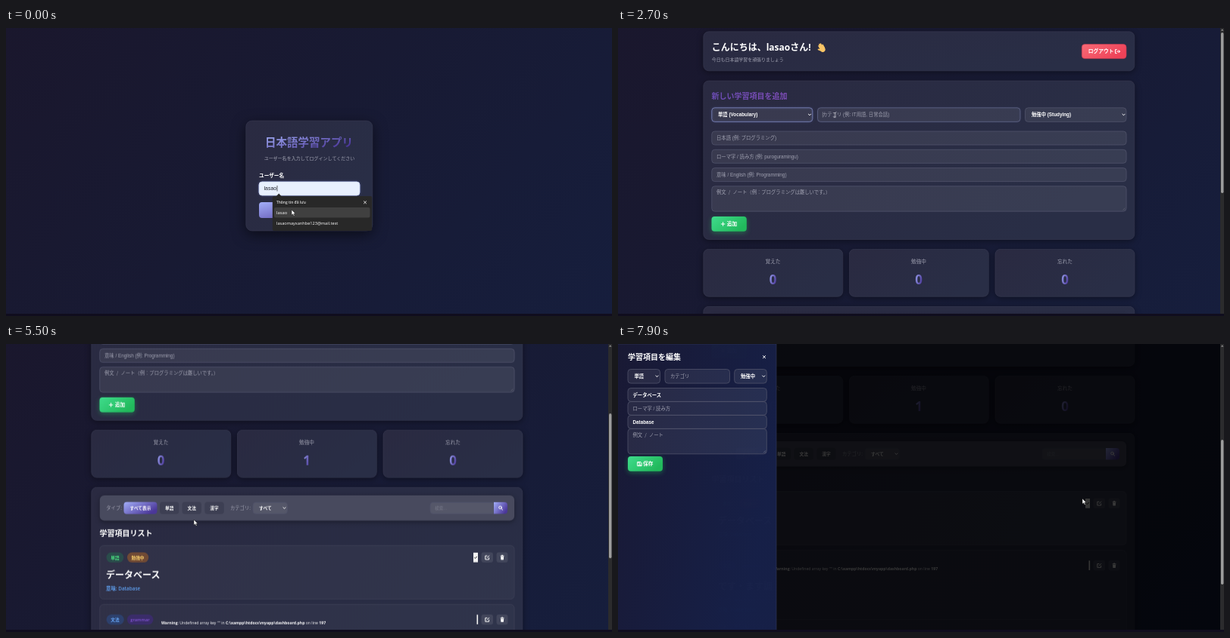
These frames come from a looping animation (800 px wide and 382 px high, 8000 ms). An HTML page:

```html
<!DOCTYPE html>
<html lang="ja">
<head>
<meta charset="utf-8">
<title>日本語学習アプリ</title>
<style>
html, body { margin: 0; height: 100%; overflow: hidden; background: #191a32; }
svg { display: block; width: 100vw; height: 100vh; background: linear-gradient(135deg, #1a172d, #181a33 45%, #161e3d); }
text { font: 6.3px "Open Sans", "Noto Sans CJK JP", sans-serif; fill: #fff; white-space: pre; }
.b { font-weight: 700; }
.s { font-weight: 600; }
.f { font-family: "Liberation Sans", "Noto Sans CJK JP", sans-serif; font-size: 6.33px; }
.n { font-family: "Noto Sans CJK JP", monospace; font-size: 6.33px; }
.m { fill: #9fa0b0; }
.k { fill: #20222c; }
.c { text-anchor: middle; }
.h { font-size: 10px; font-weight: 700; }
.t { font-size: 12px; font-weight: 700; }
.tag { font-size: 5.7px; font-weight: 600; text-anchor: middle; }
.val { font-size: 17px; font-weight: 700; text-anchor: middle; fill: url(#accent); }
.card { fill: url(#panel); stroke: #3a3c53; stroke-width: .6; filter: drop-shadow(0 2px 4px #0006); }
.item { fill: #fff; fill-opacity: .03; stroke: #44465c; stroke-width: .6; }
.field { fill: #fff; fill-opacity: .07; stroke: #50526a; stroke-width: .8; }
.filled { fill: #e8f0fe; stroke: #c8d0e8; stroke-width: .6; }
.focus { fill: none; stroke: #8590d0; stroke-width: .8; filter: drop-shadow(0 0 1.5px #7d8ef088); }
.chip { fill: #fff; fill-opacity: .09; }
.line { fill: none; stroke: #fff; stroke-width: 1; stroke-linecap: round; stroke-linejoin: round; }
.green { fill: url(#go); filter: drop-shadow(0 2px 3px #22c55e66); }

/* one loop = 8 s, so 1.25% = 100 ms */
.step, .move { animation: 8s step-end infinite; }
.move { animation-timing-function: ease-in-out; }
#login { animation-name: login; }
#popup { animation-name: popup; }
#dash { animation-name: dash; }
#entry { animation-name: entry; animation-timing-function: ease-out; }
#page { animation-name: scroll; }
#bar { animation-name: bar; }
#cursor { animation-name: cursor; animation-timing-function: linear; }
.before { animation-name: before; }
.after { animation-name: after; }
#typeFocus { animation-name: typeFocus; }
#catFocus { animation-name: catFocus; }
.auto { animation-name: auto; }
.hint { animation-name: hint; }
#caret { animation-name: caret; }
#lift { animation-name: lift; }
#hover { animation-name: hover; }
#shade { animation-name: shade; }
#drawer { animation-name: drawer; }
#arrow { animation-name: arrow; }
#beam { animation-name: beam; }
#hand { animation-name: hand; }
@keyframes login { 0% { opacity: 1 } 3.75%, 100% { opacity: 0 } }
@keyframes popup { 0% { opacity: 1 } 1.25%, 100% { opacity: 0 } }
@keyframes dash { 0% { opacity: 0 } 3.75%, 100% { opacity: 1 } }
@keyframes entry {
  0%, 3.75% { opacity: 0; transform: translateY(9.5px) }
  11.25%, 58.74% { opacity: 1; transform: none }
  58.75% { opacity: 0; transform: translateY(9.5px) }
  66.25%, 100% { opacity: 1; transform: none }
}
@keyframes before { 0% { opacity: 1 } 58.75%, 100% { opacity: 0 } }
@keyframes after { 0% { opacity: 0 } 58.75%, 100% { opacity: 1 } }
@keyframes scroll {
  0%, 63.75% { transform: none; animation-timing-function: ease-in }
  68.75% { transform: translateY(-179px); animation-timing-function: ease-out }
  73.75%, 100% { transform: translateY(-251px) }
}
@keyframes bar {
  0%, 63.75% { transform: none; animation-timing-function: ease-in }
  68.75% { transform: translateY(86px); animation-timing-function: ease-out }
  73.75%, 100% { transform: translateY(121px) }
}
@keyframes cursor {
  0%, 16.25% { transform: translate(377px, 241px) }
  20% { transform: translate(222px, 93px) }
  21.25% { transform: translate(210px, 102.5px) }
  22.5%, 28.75% { transform: translate(196px, 112px) }
  32.5%, 33.75% { transform: translate(286px, 115px) }
  37.5%, 45% { transform: translate(290px, 134px) }
  50% { transform: translate(219px, 186px) }
  55%, 61.25% { transform: translate(150px, 258px) }
  67.5%, 70% { transform: translate(248px, 233px) }
  77.5%, 80% { transform: translate(161px, 94px) }
  88.75%, 92.5% { transform: translate(632px, 209px) }
  98%, 100% { transform: translate(613px, 205px) }
}
@keyframes typeFocus { 0%, 24.9% { opacity: 0 } 27.5%, 32.5% { opacity: 1 } 36.25%, 100% { opacity: 0 } }
@keyframes catFocus { 0%, 32.4% { opacity: 0 } 36.25%, 58.74% { opacity: 1 } 58.75%, 100% { opacity: 0 } }
@keyframes auto { 0% { opacity: 0 } 42.5% { opacity: 1 } 58.75%, 100% { opacity: 0 } }
@keyframes hint { 0% { opacity: 1 } 42.5% { opacity: 0 } 58.75%, 100% { opacity: 1 } }
@keyframes caret { 0% { opacity: 0; transform: none } 32.5% { opacity: 1 } 42.5% { opacity: 1; transform: translateX(18.5px) } 56.25%, 100% { opacity: 0; transform: none } }
@keyframes lift { 0%, 75% { transform: none } 78%, 81.25% { transform: translateY(-1.5px) } 84%, 100% { transform: none } }
@keyframes hover { 0%, 85% { opacity: 0 } 88%, 100% { opacity: 1 } }
@keyframes shade { 0%, 92.4% { opacity: 0 } 96.25%, 100% { opacity: 1 } }
@keyframes drawer { 0%, 92.4% { transform: translateX(-212px); animation-timing-function: ease } 96.25%, 100% { transform: none } }
@keyframes arrow { 0% { opacity: 1 } 31.25% { opacity: 0 } 60% { opacity: 1 } 76.25% { opacity: 0 } 82.5% { opacity: 1 } 88.75% { opacity: 0 } 93.75%, 100% { opacity: 1 } }
@keyframes beam { 0% { opacity: 0 } 31.25% { opacity: 1 } 53.75%, 100% { opacity: 0 } }
@keyframes hand { 0% { opacity: 0 } 53.75% { opacity: 1 } 60% { opacity: 0 } 76.25% { opacity: 1 } 82.5% { opacity: 0 } 88.75% { opacity: 1 } 93.75%, 100% { opacity: 0 } }
</style>
</head>
<body>
<svg viewBox="0 0 800 382" preserveAspectRatio="none">
<defs>
  <linearGradient id="panel" x2="1" y2=".4"><stop stop-color="#2a2a41"/><stop offset="1" stop-color="#292e46"/></linearGradient>
  <linearGradient id="accent" x2="1" y2=".6"><stop stop-color="#a3aef8"/><stop offset="1" stop-color="#4b3799"/></linearGradient>
  <linearGradient id="title"><stop stop-color="#6b4cb4"/><stop offset="1" stop-color="#7d4cb6"/></linearGradient>
  <linearGradient id="go" x2="1" y2=".5"><stop stop-color="#3fdc8c"/><stop offset="1" stop-color="#22b95c"/></linearGradient>
  <linearGradient id="red" x2="1" y2=".5"><stop stop-color="#f86a76"/><stop offset="1" stop-color="#ee4258"/></linearGradient>
  <linearGradient id="side" x2="1" y2=".4"><stop stop-color="#1a1a36"/><stop offset="1" stop-color="#17214a"/></linearGradient>
  <path id="chev" class="line" d="M-1.6-.8 0 .8 1.6-.8"/>
  <path id="cross" class="line" d="M-1.6-1.6 1.6 1.6M1.6-1.6-1.6 1.6"/>
  <g id="tools">
    <rect class="chip" x="627.5" width="15.5" height="13.5" rx="3"/>
    <rect class="chip" x="647.5" width="15" height="13.5" rx="3"/>
    <path class="line" d="M635 4.6h-2.2v4.8h4.8v-2.2M635 7.2l2.8-2.8"/>
    <path d="M652.7 4.2h4.8v1h-4.8zM653 5.7h4.2l-.4 4.3h-3.4zM654.2 3.5h1.8v.8h-1.8z" fill="#fff"/>
  </g>
</defs>

<g id="login" class="step">
  <rect class="card" x="316.8" y="123" width="167" height="146" rx="8" style="filter:drop-shadow(0 5px 9px #0008)"/>
  <text class="b c" x="400" y="157.3" style="font-size:14.5px;fill:url(#accent)">日本語学習アプリ</text>
  <text class="m c" x="400.5" y="174.6" style="font-size:6.03px">ユーザー名を入力してログインしてください</text>
  <text class="b" x="334" y="197.8" style="font-size:6.65px">ユーザー名</text>
  <rect class="focus" x="334" y="204" width="133" height="18" rx="4"/>
  <rect class="filled" x="334" y="204" width="133" height="18" rx="4"/>
  <text class="f k" x="340.5" y="215.2" style="font-size:7px">lasao</text>
  <path d="M358 209v7.5" stroke="#222" stroke-width=".7"/>
  <rect x="334" y="231" width="133" height="21" rx="4" fill="url(#accent)"/>
  <text class="b c" x="400" y="244">ログイン</text>
  <g id="popup" class="step">
    <path d="M356.5 223.5l3.7-4 3.7 4z" fill="#282828"/>
    <rect x="351.8" y="223" width="131.4" height="46" rx="2" fill="#282828"/>
    <text class="s" x="357" y="233.2" style="font-size:4.9px;fill:#ddd">Thông tin đã lưu</text>
    <use href="#cross" x="474" y="231.3" opacity=".8"/>
    <rect x="354" y="238" width="126.5" height="13.5" rx="2" fill="#404040"/>
    <text x="357" y="247" style="font-size:5.8px">lasao</text>
    <text x="357" y="261.2" style="font-size:5.6px">lasaomayxanhbe123@mail.test</text>
  </g>
</g>

<g id="dash" class="step">
  <g id="entry" class="move"><g id="page" class="move">
    <rect class="card" x="112.8" y="4.8" width="569" height="52" rx="7"/>
    <text class="t" x="123.7" y="30">こんにちは、lasaoさん!</text>
    <g transform="translate(269.5 27) rotate(-28)" fill="none" stroke="#f9c566" stroke-linecap="round" stroke-width="1.7">
      <path d="M-2.4 0v-5M-.7 0v-6.4M1-.2v-6M2.7.6v-4.4M-3 1.5l-2-2.6"/>
      <ellipse cy="1.5" rx="2.6" ry="2.8" fill="#f9c566"/>
    </g>
    <text class="m" x="123.7" y="44" style="font-size:5.95px">今日も日本語学習を頑張りましょう</text>
    <rect x="612.3" y="21.6" width="58.7" height="19" rx="4" fill="url(#red)" stroke="#c43d53" stroke-width=".7"/>
    <text class="b" x="620.7" y="33.4" style="font-size:6.8px">ログアウト</text>
    <path class="line" d="M658.3 28.6h-1.8v5h1.8M658.6 31.1h3.8M661 29.5l1.6 1.6-1.6 1.6"/>

    <rect class="card" x="112.8" y="70" width="569" height="210.5" rx="7"/>
    <text class="h" x="123.5" y="93.5" style="fill:url(#title)">新しい学習項目を追加</text>
    <rect class="field" x="123.8" y="105.8" width="133" height="18.6" rx="4"/>
    <rect class="field" x="263.5" y="105.8" width="267.5" height="18.6" rx="4"/>
    <rect class="field" x="537.5" y="105.8" width="133.5" height="18.6" rx="4"/>
    <rect class="field" x="123.8" y="137" width="547.3" height="18" rx="4"/>
    <rect class="field" x="123.8" y="161.3" width="547.3" height="18" rx="4"/>
    <rect class="field" x="123.8" y="185.6" width="547.3" height="18" rx="4"/>
    <rect class="field" x="123.8" y="209.8" width="547.3" height="33.4" rx="4"/>
    <path d="M666.5 241.5l2.8-2.8M668.2 241.5l1.1-1.1" stroke="#6c6e80" stroke-width=".5"/>
    <text class="f s" x="132" y="117.3">単語 (Vocabulary)</text><use href="#chev" x="253" y="115"/>
    <text class="f s" x="546" y="117.3">勉強中 (Studying)</text><use href="#chev" x="667.5" y="115"/>
    <g class="step hint">
      <text class="f m" x="270" y="117.3">カテゴリ (例: IT用語, 日常会話)</text>
      <text class="f m" x="130" y="148.3">日本語 (例: プログラミング)</text>
      <text class="f m" x="130" y="196.9">意味 / English (例: Programming)</text>
    </g>
    <text class="f m" x="130" y="172.6">ローマ字 / 読み方 (例: puroguramingu)</text>
    <text class="n m" x="130" y="220.3">例文 <tspan dx="1.7">/</tspan> <tspan dx="1.7">ノート（例：プログラミングは難しいです。）</tspan></text>
    <rect id="typeFocus" class="focus move" x="123.8" y="105.8" width="133" height="18.6" rx="4"/>
    <rect id="catFocus" class="focus move" x="263.5" y="105.8" width="267.5" height="18.6" rx="4"/>
    <g class="step auto">
      <rect class="filled" x="263.8" y="106" width="267" height="18.2" rx="4"/>
      <rect class="filled" x="123.8" y="137" width="547.3" height="18" rx="4"/>
      <rect class="filled" x="123.8" y="185.6" width="547.3" height="18" rx="4"/>
      <text class="f k" x="270" y="117.3">IT用語</text>
      <text class="f k" x="130" y="148.3">データベース</text>
      <text class="f k" x="130" y="196.9">Database</text>
    </g>
    <path id="caret" class="step" d="M270.3 111.3v7.4" stroke="#8a8c9a" stroke-width=".7"/>
    <rect class="green" x="123.5" y="250" width="46.3" height="19.7" rx="4"/>
    <path class="line" d="M136.3 260h4.6M138.6 257.7v4.6" stroke-width="1.2"/>
    <text class="b" x="143.8" y="262.4" style="font-size:6.7px">追加</text>

    <g id="lift" class="move">
      <rect class="card" x="112.8" y="293.3" width="184" height="63" rx="7"/>
      <text class="m c" x="204.5" y="312" style="font-size:6.65px">覚えた</text><text class="val" x="204.5" y="339.8">0</text>
    </g>
    <rect class="card" x="305.3" y="293.3" width="184" height="63" rx="7"/>
    <text class="m c" x="397" y="312" style="font-size:6.65px">勉強中</text>
    <text class="val step before" x="397" y="339.8">0</text><text class="val step after" x="397" y="339.8">1</text>
    <rect class="card" x="498" y="293.3" width="184" height="63" rx="7"/>
    <text class="m c" x="590" y="312" style="font-size:6.65px">忘れた</text><text class="val" x="590" y="339.8">0</text>

    <rect class="card" x="112.8" y="369.3" width="569" height="340" rx="7"/>
    <rect x="123.8" y="380" width="547.3" height="33.5" rx="6" fill="#484a5e" style="filter:drop-shadow(0 2px 3px #0005)"/>
    <text class="m" x="132.3" y="398.8">タイプ:</text>
    <rect x="155.5" y="388.8" width="44" height="16" rx="4" fill="url(#accent)"/>
    <rect x="203" y="388.8" width="25.3" height="16" rx="4" fill="#3d3f53"/>
    <rect x="232.5" y="388.8" width="25.5" height="16" rx="4" fill="#3d3f53"/>
    <rect x="262.3" y="388.8" width="25.5" height="16" rx="4" fill="#3d3f53"/>
    <text class="tag b" x="177.5" y="398.8">すべて表示</text><text class="tag b" x="215.7" y="398.8">単語</text>
    <text class="tag b" x="245.2" y="398.8">文法</text><text class="tag b" x="275" y="398.8">漢字</text>
    <text class="m" x="296" y="398.8">カテゴリ:</text>
    <rect class="field" x="326" y="389.2" width="45.5" height="15.2" rx="4"/>
    <text class="b" x="334" y="398.8" style="font-size:5.8px">すべて</text><use href="#chev" x="367.5" y="396.8"/>
    <path class="field" d="M644 389.2h-80a4 4 0 0 0-4 4v7.2a4 4 0 0 0 4 4h80z"/>
    <text class="f" x="566" y="398.8" style="font-size:5.7px;fill:#777989">検索...</text>
    <path d="M644 389h14a4 4 0 0 1 4 4v7.5a4 4 0 0 1-4 4h-14z" fill="url(#accent)"/>
    <g class="line"><circle cx="652.5" cy="396.1" r="1.8"/><path d="M653.9 397.5l1.7 1.7"/></g>
    <text class="h" x="123.5" y="434.3">学習項目リスト</text>

    <rect class="item" x="123.8" y="446.6" width="547.3" height="71" rx="5"/>
    <rect id="hover" class="item move" x="123.8" y="446.6" width="547.3" height="71" rx="5"/>
    <rect x="132.5" y="455.6" width="22.8" height="13.5" rx="6.7" fill="#2a4c4b"/><text class="tag" x="143.9" y="464.5" style="fill:#4ade80">単語</text>
    <rect x="160" y="455.6" width="28.2" height="13.5" rx="6.7" fill="#704a35"/><text class="tag" x="174" y="464.5" style="fill:#fad06c">勉強中</text>
    <rect x="617" y="456" width="6" height="12.7" fill="#f4f4f4"/><path d="M618.3 462.3l1.2 1.3 2.2-2.6" stroke="#222" fill="none"/>
    <use href="#tools" y="455.6"/>
    <text class="t" x="132" y="490">データベース</text>
    <text class="s" x="132" y="506" style="font-size:6.4px;fill:#5f9fee">意味: Database</text>

    <rect class="item" x="123.8" y="524.6" width="547.3" height="125" rx="5"/>
    <rect x="132.5" y="538" width="23.3" height="13.5" rx="6.7" fill="#2d406c"/><text class="tag" x="144" y="546.8" style="fill:#68a8fa">文法</text>
    <rect x="159.8" y="538" width="34.7" height="13.5" rx="6.7" fill="#3a2c69"/><text class="tag" x="177" y="546.6" style="fill:#8355d5">grammar</text>
    <text x="205" y="551" style="font-size:5.15px"><tspan class="b">Warning</tspan>: Undefined array key "" in <tspan class="b">C:\xampp\htdocs\myapp\dashboard.php</tspan> on line <tspan class="b">197</tspan></text>
    <rect x="621.5" y="538.3" width="1.6" height="12.7" fill="#f4f4f4"/>
    <use href="#tools" y="538"/>
    <text class="t" x="132" y="577">です・ます調</text>
    <text class="m" x="132" y="592" style="font-size:5.9px;font-style:italic">読み方: desu masu chou</text>
    <text class="s" x="132" y="606" style="font-size:6.4px;fill:#5f9fee">意味: Polite form</text>
    <path d="M132 616.5h531" stroke="#44465c" stroke-width=".6"/>
    <text class="m" x="132" y="627.3" style="font-size:5.9px">例文: 丁寧な話し方です。</text>
  </g></g>

  <g id="shade" class="move"><rect width="795" height="382" fill="#000" fill-opacity=".78"/></g>
  <g id="drawer" class="move">
    <rect x="-2" width="211" height="382" fill="url(#side)" fill-opacity=".96" stroke="#343a5c" stroke-width=".6"/>
    <text class="h" x="13" y="20.8">学習項目を編集</text><use href="#cross" x="193" y="17.2"/>
    <rect class="field" x="13" y="33.5" width="42.5" height="18.6" rx="4"/>
    <rect class="field" x="62" y="33.5" width="85.5" height="18.6" rx="4"/>
    <rect class="field" x="153.7" y="33.5" width="42.6" height="18.6" rx="4"/>
    <rect class="field" x="13" y="58.5" width="183.3" height="17.8" rx="4"/>
    <rect class="field" x="13" y="76.5" width="183.3" height="17.8" rx="4"/>
    <rect class="field" x="13" y="94.5" width="183.3" height="17.8" rx="4"/>
    <rect class="field" x="13" y="112.5" width="183.3" height="33.3" rx="4"/>
    <path d="M192 144.3l3-3M194 144.3l1-1" stroke="#888a9a" stroke-width=".5"/>
    <text class="f b" x="21.5" y="45">単語</text><use href="#chev" x="51.5" y="42.8"/>
    <text class="f m" x="69" y="45">カテゴリ</text>
    <text class="f b" x="162" y="45">勉強中</text><use href="#chev" x="192.3" y="42.8"/>
    <text class="f s" x="19.5" y="69.8">データベース</text>
    <text class="f m" x="19.5" y="87.8">ローマ字 / 読み方</text>
    <text class="f s" x="19.5" y="105.8">Database</text>
    <text class="n m" x="19.5" y="123">例文 <tspan dx="1.7">/</tspan> <tspan dx="1.7">ノート</tspan></text>
    <rect class="green" x="13" y="149" width="46" height="19.8" rx="4"/>
    <path class="line" d="M26 156.5h4l1.2 1.2v4h-5.2zM27.2 156.5v1.6h2.2M27.5 161.5v-1.6h2.2v1.6" stroke-width=".8"/>
    <text class="b" x="33.2" y="161.4" style="font-size:6.7px">保存</text>
  </g>

  <rect x="795" width="5" height="382" fill="#2b2b2d"/>
  <path d="M796 3.5l1.7-2 1.7 2z" fill="#a0a0a0"/>
  <rect class="step before" x="796" y="6" width="3.4" height="213" rx="1.7" fill="#9d9d9d"/>
  <g class="step after"><rect id="bar" class="move" x="796" y="6" width="3.4" height="192" rx="1.7" fill="#9d9d9d"/></g>
</g>

<rect y="379" width="800" height="3" fill="#100d1e"/>

<g id="cursor" class="move">
  <path id="arrow" class="step" d="M0 0v7.2l1.7-1.5 1.2 2.6 1.2-.6-1.2-2.5h2.2z" fill="#fff" stroke="#111" stroke-width=".5"/>
  <path id="beam" class="step" d="M-1.5-2.5h3M0-2.5v6M-1.5 3.5h3" fill="none" stroke="#c4c4cc" stroke-width=".7"/>
  <path id="hand" class="step" d="M-.8 0q.8-1 1.6 0v3l3 .8q.8.3.7 1.2l-.7 3.4h-4.2l-2.6-3.2q0-1 1-.7l1.2.8z" fill="#fff" stroke="#111" stroke-width=".4"/>
</g>
</svg>
</body>
</html>
```
